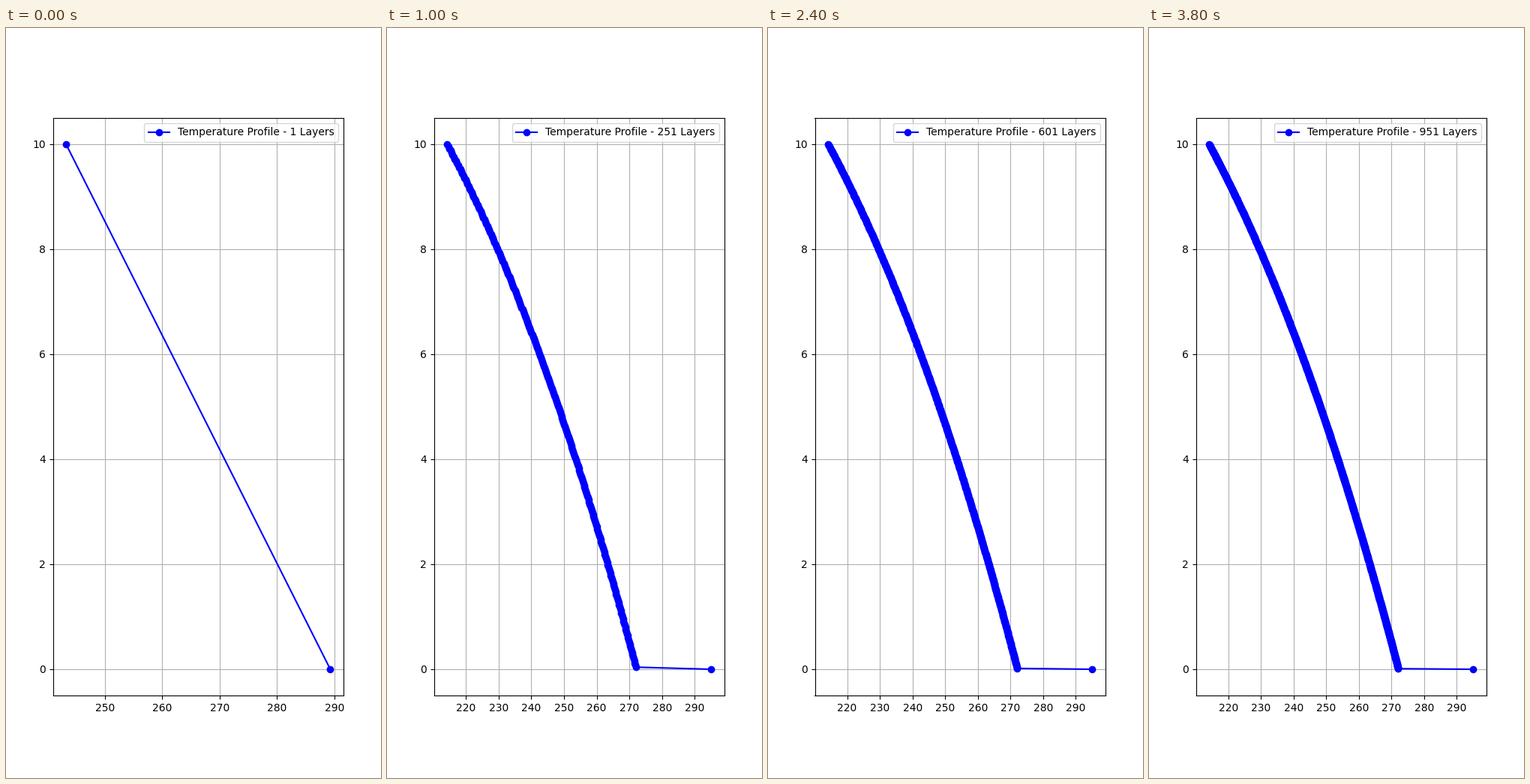
Write a matplotlib script that moves like this. It is 500 px wide and 1000 px high and loops after 4 s.

```python
import numpy as np
import matplotlib.pyplot as plt
from matplotlib.animation import FuncAnimation

SOLAR = 1361.0
ALBEDO = 0.3
SIGMA = 5.67e-8
EMISSIVITY = 0.8      # of the whole atmosphere
TOP = 10.0            # height of the column
STEP = 50             # layers added per frame
FRAMES = 20


def profile(n):
    """Radiative equilibrium of n equal grey layers above a black surface."""
    emitted = SOLAR * (1 - ALBEDO) / 4 / SIGMA
    eps = 1 - (1 - EMISSIVITY) ** (1 / n)
    depth = np.arange(n - 1, -1, -1)          # layers above each layer
    layers = (1 + depth * eps) / (2 - eps)
    surface = 1 + n * eps / (2 - eps)
    temps = (emitted * np.append(surface, layers)) ** 0.25
    return temps, np.linspace(0, TOP, n + 1)


fig, ax = plt.subplots(figsize=(5, 10), dpi=100)


def draw(i):
    n = 1 + STEP * i
    temps, heights = profile(n)
    ax.clear()
    ax.plot(temps, heights, "-o", color="blue",
            label=f"Temperature Profile - {n} Layers")
    ax.grid(True)
    ax.legend(loc="upper right")
    return ax.lines


anim = FuncAnimation(fig, draw, frames=FRAMES, init_func=lambda: draw(0),
                     interval=200, repeat=True, repeat_delay=0)
plt.show()
```
